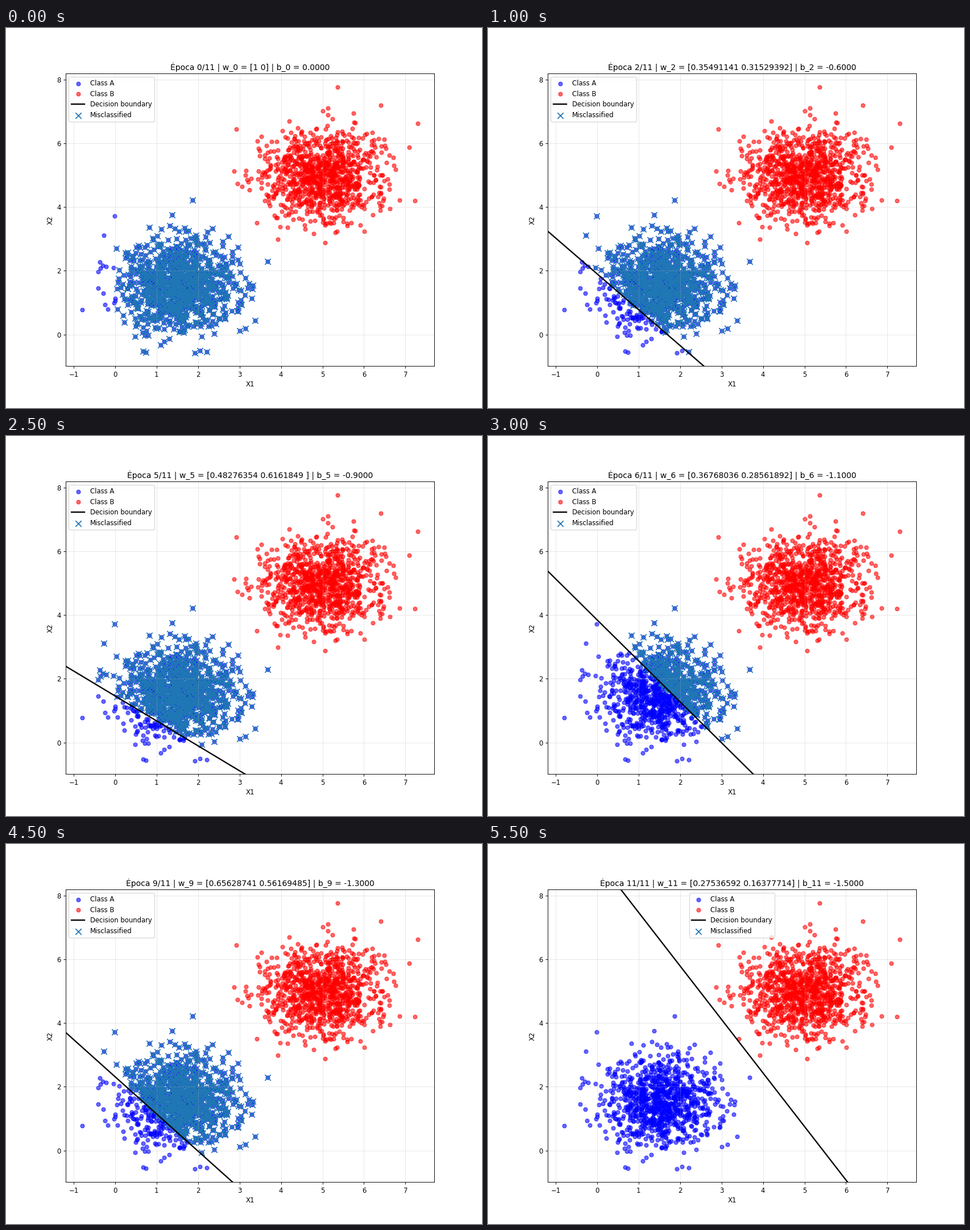
A matplotlib script for the animation above (6000 ms loop, 837 by 669 pixels).

```python
import numpy as np
import matplotlib.pyplot as plt
from matplotlib.animation import FuncAnimation

N_POINTS = 1000
EPOCHS = 11
RATE = 0.1
DPI = 83.7

plt.rcParams["font.family"] = "DejaVu Sans"

rng = np.random.RandomState(42)
spread = np.sqrt(0.5)
class_a = 1.5 + spread * rng.randn(N_POINTS, 2)
class_b = 5.0 + spread * rng.randn(N_POINTS, 2)
points = np.vstack([class_a, class_b])
labels = np.repeat([0, 1], N_POINTS)


def predict(x, w, b):
    return (x @ w + b >= 0).astype(int)


def train():
    """Perceptron over the points in order; returns (w, b) after each epoch."""
    w, b = np.array([1, 0]), 0.0
    history = [(w, b)]
    for _ in range(EPOCHS):
        for x, label in zip(points, labels):
            error = label - int(x @ w + b >= 0)
            if error:
                w = w + RATE * error * x
                b += RATE * error
        history.append((w, b))
    return history


def padded(values, margin=0.05):
    low, high = values.min(), values.max()
    pad = margin * (high - low)
    return low - pad, high + pad


history = train()

# A hair over the whole pixel, so the canvas size never rounds down.
fig, ax = plt.subplots(figsize=(837.01 / DPI, 669.01 / DPI), dpi=DPI)
ax.scatter(*class_a.T, color="blue", alpha=0.6, label="Class A")
ax.scatter(*class_b.T, color="red", alpha=0.6, label="Class B")
boundary, = ax.plot([], [], color="black", lw=2, label="Decision boundary")
missed = ax.scatter([], [], marker="x", s=80, color="C0", label="Misclassified")

xlim, ylim = padded(points[:, 0]), padded(points[:, 1])
ax.set(xlim=xlim, ylim=ylim, xlabel="X1", ylabel="X2")
ax.grid(alpha=0.3)
title = ax.set_title("")
legend = ax.legend(loc="upper left")


def update(epoch):
    w, b = history[epoch]
    if w[1] == 0:
        boundary.set_data([], [])
    else:
        xs = np.array(xlim)
        boundary.set_data(xs, -(w[0] * xs + b) / w[1])
    missed.set_offsets(points[predict(points, w, b) != labels])
    title.set_text(f"Época {epoch}/{EPOCHS} | w_{epoch} = {w} | b_{epoch} = {b:.4f}")
    legend.set_loc("upper center" if epoch == EPOCHS else "upper left")
    return boundary, missed, title, legend


anim = FuncAnimation(fig, update, frames=EPOCHS + 1, interval=500,
                     repeat=True, blit=False)
plt.show()
```
